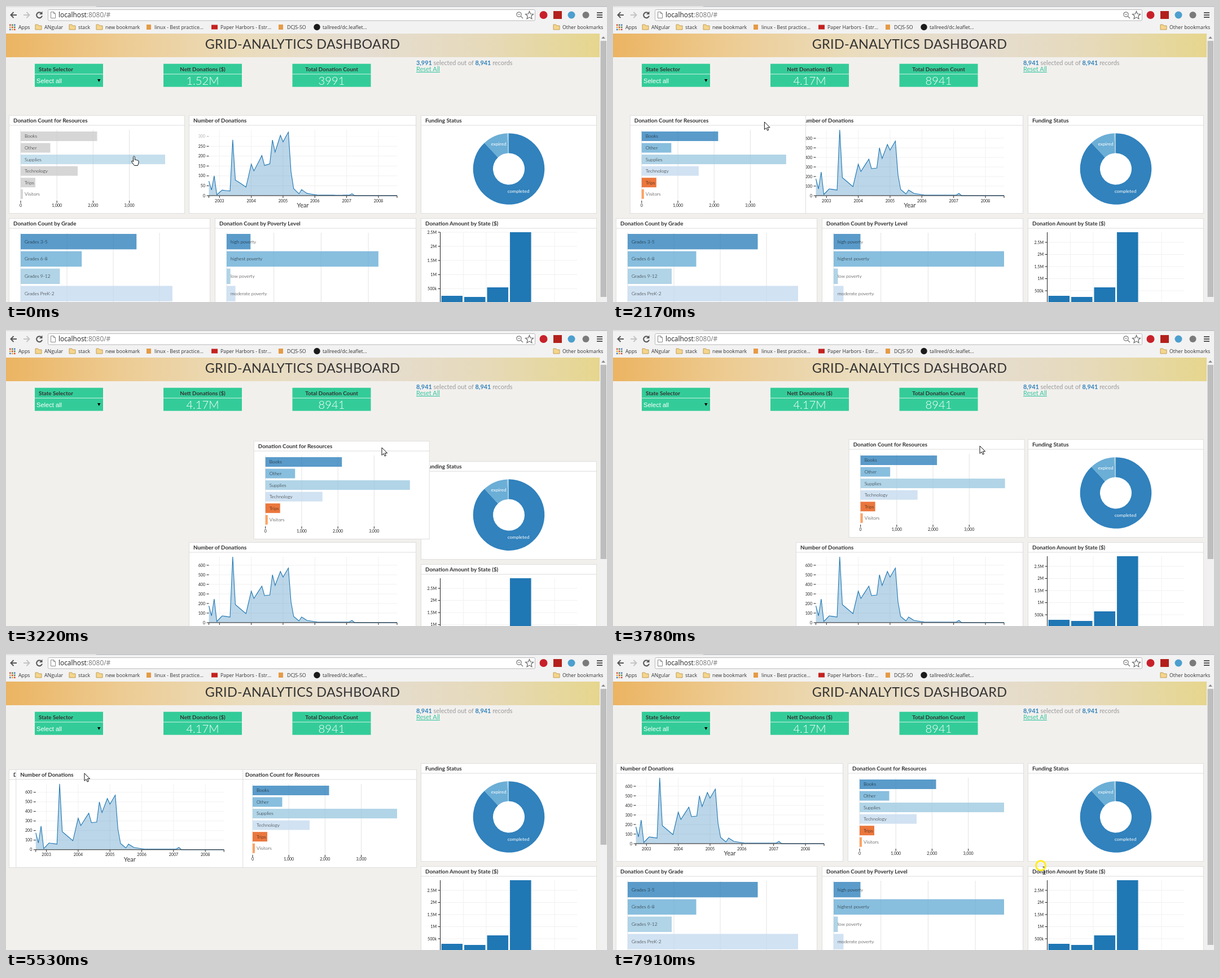
Animation of 1065 by 526 pixels, one loop 8000 ms. Source, as an HTML page:

```html
<!DOCTYPE html>
<html lang="en">
<head>
<meta charset="utf-8">
<title>Dashboard</title>
<style>
html, body { margin: 0; width: 100%; height: 100%; overflow: hidden; background: #f2f0ed; }
svg { display: block; width: 1065px; height: 526px; }
text { font-family: Lato, sans-serif; fill: #222; white-space: pre; }
.ui { font: 8.8px "Open Sans", sans-serif; fill: #333; }
.url { font: 11.9px "Open Sans", sans-serif; }
.pick { font: 11.1px "Liberation Sans", sans-serif; fill: #fff; }
.title { font-size: 23.4px; letter-spacing: .28px; fill: #333; }
.head { font-size: 9.8px; font-weight: 700; fill: #333; }
.big { font-size: 20.2px; font-weight: 300; fill: #fff; }
.note { font-size: 10.9px; fill: #999; }
.note tspan { font-weight: 700; fill: #3182bd; }
.reset { font-size: 11px; fill: #35c4a0; text-decoration: underline; }
.row { font-size: 8.4px; font-weight: 300; fill: #111; }
.axis { font-size: 7.1px; }
.year { font-size: 11px; fill: #333; }
.pie { font-size: 8.4px; fill: #fff; }
.mid { text-anchor: middle; }
.end { text-anchor: end; }
</style>
</head>
<body>
<svg id="stage" viewBox="0 0 1065 526"></svg>
<script>
const LOOP = 8000;
const BLUES = ['#3182bd', '#6baed6', '#9ecae1', '#c6dbef', '#e6550d', '#fd8d3c'];
const $ = id => document.getElementById(id);
const lerp = (a, b, k) => a + (b - a) * k;
const clamp = v => Math.max(0, Math.min(1, v));
const ease = v => { const k = clamp(v); return k < .5 ? 4 * k ** 3 : 1 - 4 * (1 - k) ** 3; };
const range = (n, fn) => Array.from({ length: n }, (_, i) => fn(i));
const draw = (list, fn) => list.map(fn).join('');

// Linear interpolation through [position, ...values] keys.
function along(keys, t) {
  const i = keys.findIndex(k => k[0] > t);
  if (i < 1) return (i ? keys[keys.length - 1] : keys[0]).slice(1);
  const a = keys[i - 1], b = keys[i], k = (t - a[0]) / (b[0] - a[0]);
  return a.slice(1).map((v, j) => lerp(v, b[j + 1], k));
}

const rect = (x, y, w, h, fill, more = '') =>
  `<rect x="${x}" y="${y}" width="${w}" height="${h}" fill="${fill}" ${more}/>`;
const line = (x1, y1, x2, y2, color = '#222', w = 1) =>
  `<path d="M${x1} ${y1}L${x2} ${y2}" stroke="${color}" stroke-width="${w}"/>`;
const text = (x, y, cls, s, more = '') => `<text x="${x}" y="${y}" class="${cls}" ${more}>${s}</text>`;
const circle = (x, y, r, fill) => `<circle cx="${x}" cy="${y}" r="${r}" fill="${fill}"/>`;

// ---------- browser frame ----------
const folder = x =>
  `<path d="M${x} 33h4.5l1.5 2h5v7h-11z" fill="#f5d58c" stroke="#b58d3d" stroke-width=".8"/>`;

function browser() {
  const dots = draw(range(9, i => i), i => rect(6 + i % 3 * 4, 32.5 + Math.floor(i / 3) * 4, 2.6, 2.6,
    ['#d9483b', '#4a8f4c', '#4a78c8', '#e0a52c'][i % 4]));
  const marks = [[22, 'Apps'], [68, 'ANgular'], [128, 'stack'], [176, 'new bookmark'],
    [263, 'linux - Best practice...'], [380, 'Paper Harbors - Estr...'], [498, 'DCJS-SO'],
    [561, 'tallreed/dc.leaflet...'], [986, 'Other bookmarks']];
  return rect(0, 0, 1065, 49, '#f2f2f2') + rect(0, 0, 1065, 1.5, '#b9bcc0') + rect(0, 0, 160, 1.5, '#e6e6e6') +
    `<g fill="none" stroke="#555" stroke-width="2"><path d="M19 16H9M13.5 11l-5 5 5 5"/>
     <path d="M31 16h10M36.5 11l5 5-5 5" stroke="#c4c4c4"/>
     <path d="M63 13a5 5 0 1 0 1 4.5"/></g><path d="M64.5 9.5v5.5h-5.5z" fill="#555"/>` +
    rect(74.5, 6.5, 863, 19.5, '#fff', 'rx="2" stroke="#b8b8b8"') +
    '<path d="M79.5 10.5h5l3 3v8h-8zM84.5 10.5v3h3" fill="#fff" stroke="#888"/>' +
    text(93, 20, 'url', 'localhost<tspan fill="#777">:8080/#</tspan>') +
    `<g fill="none" stroke="#777" stroke-width="1.2"><circle cx="909" cy="15" r="4.2"/><path d="M907 15h4M912 18l4 4"/>
     <path d="M927.5 9.5l2 4.5 5 .5-3.7 3.3 1.1 4.9-4.4-2.6-4.4 2.6 1.1-4.9-3.7-3.3 5-.5z" stroke="#666"/></g>` +
    circle(952.5, 16, 7, '#c8202a') + rect(970, 9, 15, 14, '#b3201c') +
    circle(1002, 16, 6.5, '#4c9fce') + circle(1027.5, 16, 6, '#7a7a7a') +
    draw([12, 16, 20], y => line(1047, y, 1057, y, '#555', 2)) +
    dots + draw([52, 112, 160, 970], folder) +
    draw([249, 483], x => rect(x, 33, 8, 9, '#e69a45')) + rect(364, 33.5, 11, 8, '#c4221f') +
    circle(551, 37.5, 5.7, '#1b1b1b') + draw(marks, ([x, s]) => text(x, 40.7, 'ui', s));
}

// ---------- page header ----------
const card = (x, w, title, tx, cls = '') => rect(x, 102.7, w, 41, '#33cc99') +
  line(x, 121, x + w, 121, '#d5f3e8') + text(tx, 116, 'head ' + cls, title);

function header() {
  const stops = ['#ebb462', '#edcc94', '#eadcbc', '#e5ddd2', '#e6dabb', '#e6d68e'];
  return '<defs><linearGradient id="sun">' +
    draw(stops, (c, i) => `<stop offset="${i / 5}" stop-color="${c}"/>`) + '</linearGradient></defs>' +
    rect(0, 49, 1052, 42, 'url(#sun)') + text(525.5, 76, 'title mid', 'GRID-ANALYTICS DASHBOARD') +
    card(51, 121, 'State Selector', 58) + text(54, 137, 'pick', 'Select all') + '<path d="M162 130h5.5l-2.75 5z"/>' +
    card(279, 139, 'Nett Donations ($)', 348.5, 'mid') + text(348.5, 139.7, 'big mid', '', 'id="nett"') +
    card(507.5, 139, 'Total Donation Count', 577, 'mid') + text(577, 139.7, 'big mid', '', 'id="total"') +
    text(727, 105, 'note', '<tspan id="picked"></tspan> selected out of <tspan>8,941</tspan> records') +
    text(727, 116, 'reset', 'Reset All');
}

// ---------- panels ----------
const panel = (id, w, title, body) => `<g id="${id}">` +
  rect(.5, .5, w - 1, 174, '#fff', 'stroke="#dedede"') + line(0, 18, w, 18, '#dcdcdc') +
  text(8, 13.3, 'head', title) + body + '</g>';

function rows(id, labels, y, pitch, h, step) {
  const grid = draw(range(4, i => 21 + i * step), (x, i) => line(x, 26, x, 152, '#e3e3e3') +
    line(x, 152, x, 156) + text(x, 162.5, 'axis mid', i ? i + ',000' : '0'));
  return grid + draw(labels, (s, i) =>
    rect(21, y + i * pitch, 0, h, BLUES[i], `id="${id}${i}" fill-opacity=".8"`) +
    text(28, y + i * pitch + h / 2 + 2.9, 'row', s));
}

const MONTH = 4.695, FIRST = 35.5, BASE = 143;
function seriesFrame() {
  const years = draw(range(6, i => FIRST + (4 + 12 * i) * MONTH), (x, i) =>
    line(x, 26, x, BASE, '#f1f1f1') + line(x, BASE, x, BASE + 4) + text(x, 154.5, 'axis mid', 2003 + i));
  return years + '<g id="lineTicks"></g><path id="area" fill="#1f77b4" fill-opacity=".3"/>' +
    '<path id="curve" fill="none" stroke="#1f77b4" stroke-width="1.1"/>' +
    `<path d="M${FIRST} ${BASE + 4}v-4h333.5v4" fill="none" stroke="#222"/>` + text(202, 164, 'year mid', 'Year');
}

function slice(a, b, fill) {
  const at = (deg, r) => {
    const k = deg * Math.PI / 180;
    return `${156 + r * Math.sin(k)} ${95.5 - r * Math.cos(k)}`;
  };
  const big = +(b - a > 180);
  return `<path d="M${at(a, 63.3)}A63.3 63.3 0 ${big} 1 ${at(b, 63.3)}L${at(b, 28)}A28 28 0 ${big} 0 ${at(a, 28)}z" fill="${fill}"/>`;
}

const donut = () => slice(0, 317, BLUES[0]) + slice(317, 357.5, BLUES[1]) + slice(357.5, 360, BLUES[2]) +
  text(138, 53.5, 'pie mid', 'expired') + text(173, 137.5, 'pie mid', 'completed');

const stateFrame = () => draw(range(5, i => 75.5 + i * 40.4), x => line(x, 25, x, 150, '#f1f1f1')) +
  '<g id="stateTicks"></g>' +
  draw(range(4, i => 36.5 + i * 40.5), (x, i) => rect(x, 0, 37.5, 0, '#1f77b4', `id="state${i}"`)) +
  line(34.5, 25, 34.5, 150.5);

$('stage').innerHTML = rect(0, 0, 1065, 526, '#f2f0ed') + header() + '<g id="panels">' +
  panel('grade', 357, 'Donation Count by Grade',
    rows('g', ['Grades 3-5', 'Grades 6-8', 'Grades 9-12', 'Grades PreK-2'], 28, 30.8, 27.4, 82)) +
  panel('poverty', 357, 'Donation Count by Poverty Level',
    rows('p', ['high poverty', 'highest poverty', 'low poverty', 'moderate poverty'], 28, 30.8, 27.4, 83.7)) +
  panel('state', 312, 'Donation Amount by State ($)', stateFrame()) +
  panel('funding', 312, 'Funding Status', donut()) +
  panel('donations', 403, 'Number of Donations', seriesFrame()) +
  panel('resources', 312, 'Donation Count for Resources',
    rows('r', ['Books', 'Other', 'Supplies', 'Technology', 'Trips', 'Visitors'], 29, 20.55, 17, 64.2)) +
  '</g>' +
  rect(1052, 49, 13, 477, '#f1f1f1') + '<path d="M1055 58h7l-3.5-4z" fill="#8a8a8a"/>' +
  rect(1053.5, 62, 10.5, 0, '#bdbdbd', 'id="thumb"') + browser() +
  `<g id="cursor"><path id="arrow" d="M0 0v13.5l3.2-2.9 2 4.6 2.2-1-2-4.4h4.3z" fill="#fff" stroke="#111"/>
   <path id="hand" d="M1.5 1.5c0-2 2.8-2 2.8 0v5c1-1 2.3-.6 2.4.5 1-.8 2.2-.3 2.3.7 1-.6 2 0 2 1.2v3l-1.5 4.6h-6l-4.8-6.5c-.8-1.3.8-2.4 1.9-1.2l.9 1z" fill="#fff" stroke="#111"/>
   <path id="beam" d="M-2.5-6.5h2l.5.5.5-.5h2M0-6v12M-2.5 6.5h2l.5-.5.5.5h2" fill="none" stroke="#111"/></g>` +
  '<circle id="ring" cx="758" cy="376" r="8.5" fill="none" stroke="#ffee1c" stroke-width="3"/>';

// ---------- data ----------
const bars = { g: [230.5, 121.5, 78, 302], p: [47.5, 302, 7.5, 17.5], r: [135.5, 52.5, 256, 101, 26, 4] };
const states = [12.5, 10.5, 27.5, 125.5];
// Turning points of the donation curve: [month, height].
const turns = [[0, 30], [1, 12], [2, 42], [3, 2], [5, 12], [8, 10], [9, 117], [10, 32], [14, 16], [16, 56], [17, 43],
  [20, 65], [21, 48], [23, 49], [24, 85], [25, 66], [27, 91], [28, 81], [30, 97], [31, 37], [32, 11], [34, 3],
  [35, 10], [37, 4], [41, 1], [53, 1], [54, 4], [55, 0]];
const curve = range(72, i => along(turns, i)[0]);
const filtered = curve.map((h, i) => h * (1 + .18 * Math.sin((i - 16) / 7)));

// ---------- charts ----------
const set = (id, attrs) => { for (const k in attrs) $(id).setAttribute(k, attrs[k]); };

const tick = (x, y, x2, label, alpha) => `<g opacity="${alpha}">` + line(x, y, x2, y, '#f1f1f1') +
  line(x - 4, y, x, y) + text(x - 6.5, y + 2.5, 'axis end', label) + '</g>';

function charts(t) {
  const grow = 1 - (1 - clamp(t / 700)) ** 3;
  const mix = ease((t - 910) / 750);

  for (const id in bars) {
    const scale = id === 'r' ? 1 : lerp(.89, 1, grow);
    bars[id].forEach((w, i) => set(id + i, { width: w * scale }));
  }

  const swell = lerp(1, 1.04, grow);
  const d = 'M' + curve.map((h, i) =>
    `${FIRST + i * MONTH} ${BASE - lerp(filtered[i] * swell, h, mix)}`).join('L');
  set('curve', { d });
  set('area', { d: `${d}V${BASE}H${FIRST}z` });

  const unit = lerp(.351 * swell, .17, mix);
  $('lineTicks').innerHTML = draw(range(13, i => i * 50), v => {
    const before = v < 300 ? 1 : v > 300 ? 0 : lerp(.35, 1, grow);
    return v * unit < 118 ? tick(FIRST, BASE - v * unit, 369, v, lerp(before, +(v % 100 === 0), mix)) : '';
  });

  const half = lerp(25.1, 21.5, mix);
  $('stateTicks').innerHTML = draw(['500k', '1M', '1.5M', '2M', '2.5M'],
    (s, i) => tick(34.5, 150.5 - (i + 1) * half, 277, s, 1));
  states.forEach((h, i) => set('state' + i, { y: 150.5 - h, height: h }));
}

// ---------- motion ----------
// Pointer stops: [time, x, y].
const pointer = [[1700, 224, 267], [2000, 237, 206], [2170, 268, 206], [2800, 512, 209], [3020, 694, 209],
  [3220, 666, 209], [3640, 650, 206], [4200, 650, 206], [4600, 450, 392], [4760, 442, 389], [4880, 442, 389],
  [4970, 346, 352], [5430, 128, 226], [5530, 139, 212], [5845, 122, 197], [5880, 122, 201], [6300, 122, 206],
  [7070, 516, 398], [7490, 764, 385]];
const LAG = 35, TOP = 194, ROW = 183;

// Grid row after a list of pushes [time, row], each eased over 300 ms.
const pushed = (t, row, ...pushes) =>
  TOP + ROW * pushes.reduce((r, [at, to]) => lerp(r, to, ease((t - at) / 300)), row);

// Follows the pointer between grab and drop, then settles in its slot.
function dragged(t, home, grab, drop, dx, slot) {
  if (t < grab) return home;
  const [x, y] = along(pointer, Math.min(t, drop) - LAG);
  const k = ease((t - drop) / 200);
  return [lerp(Math.max(5, x - dx), slot[0], k), lerp(y - 12, slot[1], k)];
}

function layout(t) {
  const funding = pushed(t, 0, [2870, 1], [3034, 0]);
  const bump = pushed(t, 0, [5457, 1], [5613, 0]);
  return {
    resources: dragged(t, [5, TOP], 2030, 3710, 232, [416, bump]),
    donations: dragged(t, [324, pushed(t, 0, [2240, 1])], 4980, 6290, 118, [5, TOP]),
    funding: [735, funding],
    state: [735, funding + ROW],
    grade: [5, pushed(t, 1, [2240, 2], [5040, 0], [5457, 1])],
    poverty: [370, pushed(t, 1, [2240, 2], [5613, 1])],
    cursor: along(pointer, t)
  };
}

function render(t) {
  const all = t >= 910, hover = t < 1720, typing = t >= 7700;
  $('nett').textContent = all ? '4.17M' : '1.52M';
  $('total').textContent = all ? '8941' : '3991';
  $('picked').textContent = all ? '8,941' : '3,991';
  BLUES.forEach((c, i) => set('r' + i, {
    fill: all || i === 2 ? c : '#ccc',
    'fill-opacity': i === 2 && hover ? .6 : .8
  }));
  charts(t);

  const places = layout(t);
  for (const id in places) set(id, { transform: `translate(${places[id]})` });
  const front = $(t < 4830 ? 'resources' : 'donations');
  if ($('panels').lastChild !== front) $('panels').append(front);

  const end = t < 2380 || t >= 6300 ? 517 : t < 5460 ? 407 : 339;
  set('thumb', { height: end - 62 });
  const shown = { hand: hover, arrow: !hover && !typing, beam: typing, ring: t >= 7910 };
  for (const id in shown) set(id, { visibility: shown[id] ? 'visible' : 'hidden' });
}

const start = performance.now();
(function frame() {
  render((performance.now() - start) % LOOP);
  requestAnimationFrame(frame);
})();
</script>
</body>
</html>
```
